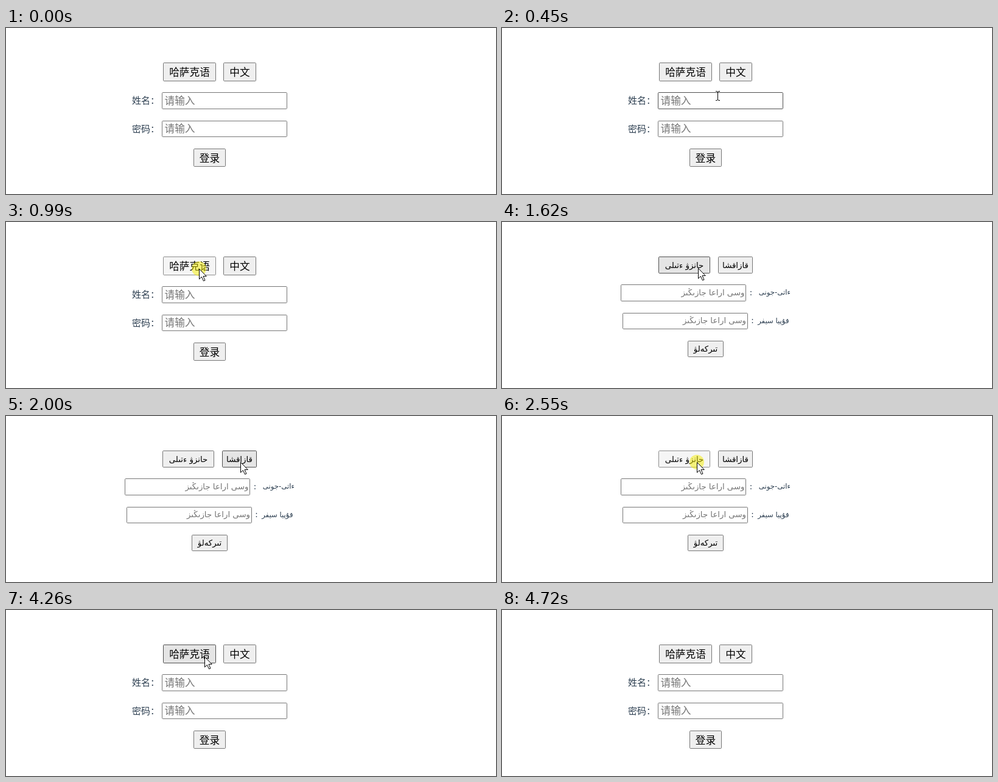
Animation, 805 px wide and 274 px high, one loop 5120 ms. Source, as an HTML page:

```html
<!DOCTYPE html>
<html lang="zh-CN">
<head>
<meta charset="utf-8">
<style>
  html, body { margin: 0; width: 100%; height: 100%; overflow: hidden; background: #fff; }
  svg { display: block; }
  text { font-family: "Noto Sans CJK SC", "Noto Sans CJK", sans-serif; }
  .kk text { font-family: "DejaVu Sans", sans-serif; direction: rtl; }
  .caption { text-anchor: middle; }
  .label { fill: #2c3e50; }
  .hint { fill: #757575; }
  rect { stroke: #767676; }
  .button { fill: #efefef; }
  .input { fill: #fff; }
  .hover { stroke: #4f4f4f; }
  .button.hover { fill: #e5e5e5; }
  .button.pressed { fill: #f5f5f5; stroke: #8d8d8d; }
</style>
</head>
<body>
<svg width="805" height="274" viewBox="0 0 805 274">
  <g id="zh"></g>
  <g id="kk" class="kk"></g>
  <circle id="glow" r="12" fill="#f5ee00" fill-opacity=".5"/>
  <path id="arrow" d="M.5 .5V17.3L4.4 13.6L7.5 20.3L10 19.2L7 12.6H12.3Z" fill="#fff" stroke="#000"/>
  <path id="beam" d="M-3 -7.5H-1L.5 -6.5L2 -7.5H4M.5 -6.5V6.5M-3 7.5H-1L.5 6.5L2 7.5H4" fill="none" stroke="#000"/>
</svg>
<script>
const LOOP = 5120;
const CENTER = 334.5, TOP = 57.2, ROW_GAP = 18.4, PITCH = 46.5;
const INPUT = { width: 206, height: 27.5 };
const $ = id => document.getElementById(id);

function add(parent, tag, attrs, content = '') {
  const el = document.createElementNS('http://www.w3.org/2000/svg', tag);
  for (const key in attrs) el.setAttribute(key, attrs[key]);
  el.textContent = content;
  parent.append(el);
  return el;
}

// Every row is centred; widths include the padding or the gap to the field.
function buildForm(group, form) {
  const boxes = [];

  function box(kind, x, y, w, h) {
    const [left, top, right, bottom] = [x, y, x + w, y + h].map(Math.round);
    const el = add(group, 'rect', {
      class: kind, rx: 1.2,
      x: left + .5, y: top + .5, width: right - left - 1, height: bottom - top - 1
    });
    boxes.push({ el, kind, left, top, right, bottom });
  }
  function text(kind, x, middle, size, content) {
    const y = Math.round(middle + size * form.drop);
    add(group, 'text', { class: kind, x, y, 'font-size': size }, content);
  }
  function buttonRow(y, buttons) {
    const total = buttons.reduce((sum, b) => sum + b.width, form.gap * (buttons.length - 1));
    let x = CENTER - total / 2;
    for (const { width, caption } of buttons) {
      box('button', x, y, width, form.height);
      text('caption', x + width / 2, y + form.height / 2, form.size, caption);
      x += width + form.gap;
    }
  }
  function fieldRow(y, { width, caption }) {
    const total = width + INPUT.width;
    const left = CENTER - total / 2, right = left + total;
    const x = form.rtl ? left : left + width;
    const end = x + INPUT.width, middle = y + 13.3;
    box('input', x, y, INPUT.width, INPUT.height);
    text('hint', form.rtl ? end - 2.5 : x + 4.5, middle, form.size, form.hint);
    text('label', form.rtl ? right : left, middle, form.labelSize, caption);
    if (form.rtl) text('label caption', end + 8, middle, form.size, ':');
  }

  const fieldsTop = TOP + form.height + ROW_GAP;
  buttonRow(TOP, form.languages);
  form.fields.forEach((field, i) => fieldRow(fieldsTop + i * PITCH, field));
  buttonRow(fieldsTop + form.fields.length * PITCH, [form.login]);
  return { group, boxes };
}

const item = (width, caption) => ({ width, caption });

const zh = buildForm($('zh'), {
  height: 30.4, gap: 12, size: 16.67, labelSize: 15, drop: .38,
  languages: [item(87, '哈萨克语'), item(54, '中文')],
  fields: [item(49, '姓名：'), item(49, '密码：')],
  hint: '请输入',
  login: item(53, '登录')
});

const kk = buildForm($('kk'), {
  rtl: true, height: 27.4, gap: 13, size: 13.3, labelSize: 11.7, drop: .35,
  languages: [item(85, 'حانزۋ ءتىلى'), item(57, 'قازاقشا')],
  fields: [item(73, 'ءاتى-جونى'), item(68, 'قۇپيا سيفر')],
  hint: 'وسى اراعا جازىڭىز',
  login: item(59, 'تىركەلۋ')
});

const easeOut = n => u => 1 - (1 - u) ** n;
const easeIn = n => u => u ** n;
const smooth = u => u * u * (3 - 2 * u);

const kkButton = [385, 76], zhButton = [320, 76];
const moves = [
  { start: 70, end: 990, steps: 12, from: [708, 256], to: [317, 77], ease: [easeOut(4.37), easeOut(3)] },
  { start: 1543, end: 2000, steps: 6, from: [317, 77], to: kkButton, ease: [smooth, smooth] },
  { start: 2243, end: 2550, steps: 4, from: kkButton, to: zhButton, ease: [smooth, smooth] },
  { start: 4260, end: 4640, steps: 5, from: [326, 77], to: [717, 260], ease: [easeIn(1.25), easeIn(1.25)] }
];
const LEAVE = 4720;
const clicks = [[990, 1160], [2550, 2780]];
const SLACK = 7;

function pointerAt(time) {
  const move = moves.filter(m => m.start <= time).pop();
  if (!move || time >= LEAVE) return null;
  const { start, end, steps, from, to, ease } = move;
  const tick = Math.floor((time - start + SLACK) * steps / (end - start));
  const u = Math.min(tick / steps, 1);
  return from.map((a, i) => Math.floor(a + (to[i] - a) * ease[i](u)));
}

function place(id, point) {
  $(id).style.display = point ? '' : 'none';
  if (point) $(id).setAttribute('transform', `translate(${point})`);
}

function draw(time) {
  const [toKk, toZh] = clicks.map(click => click[1]);
  const view = time >= toKk && time < toZh ? kk : zh;
  for (const v of [zh, kk]) v.group.style.display = v === view ? '' : 'none';

  const point = pointerAt(time);
  const held = clicks.some(([down, up]) => time >= down && time < up);
  const inside = b => point && point[0] >= b.left && point[0] < b.right
    && point[1] >= b.top && point[1] < b.bottom;
  const target = view.boxes.find(inside);
  for (const b of view.boxes) {
    const state = b !== target ? '' : held ? ' pressed' : ' hover';
    b.el.setAttribute('class', b.kind + state);
  }
  const typing = target && target.kind === 'input';
  place('beam', typing && point);
  place('arrow', !typing && point);
  place('glow', held && point);
}

const start = performance.now();
function frame() {
  draw((performance.now() - start) % LOOP);
  requestAnimationFrame(frame);
}
frame();
</script>
</body>
</html>
```
